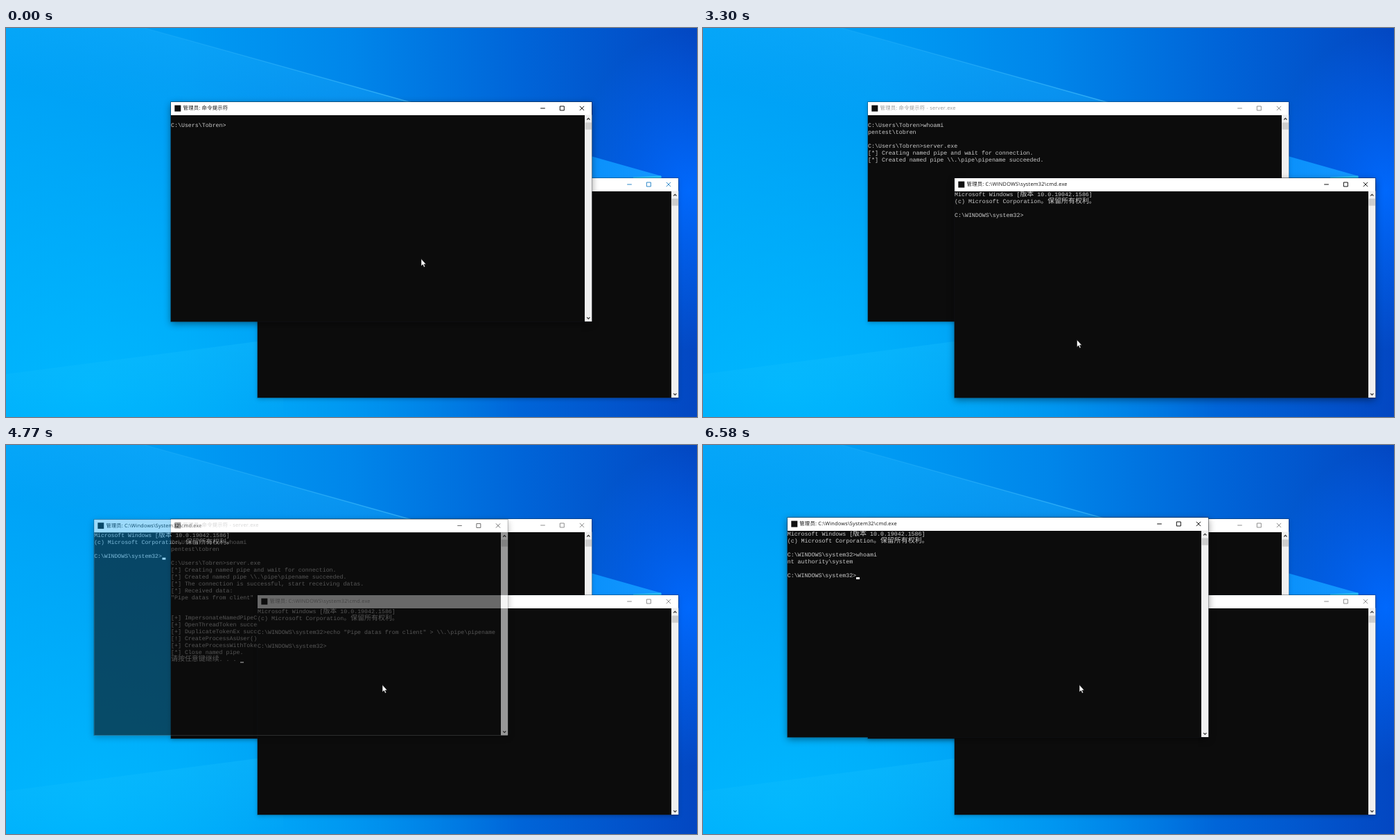
These frames come from a looping animation (997x562 px, 7220 ms). An HTML page:

```html
<!DOCTYPE html>
<html lang="zh-CN">
<head>
<meta charset="utf-8">
<title>Console</title>
<style>
html, body { margin: 0; width: 100%; height: 100%; overflow: hidden; }
#stage {
  position: relative; width: 997px; height: 562px; overflow: hidden;
  text-rendering: geometricPrecision;
  background:
    radial-gradient(170px 230px at 985px 235px, rgba(0,106,255,.95), rgba(0,106,255,0)),
    radial-gradient(620px 460px at 120px 520px, rgba(0,186,255,.85), rgba(0,186,255,0)),
    linear-gradient(90deg, #00a3f7 0, #009cf4 25%, #0086ea 50%, #0064d8 75%, #0347c2 100%);
}
#stage > svg { position: absolute; left: 0; top: 0; }
.win {
  position: absolute; width: 607.3px; height: 317px; background: #fff;
  box-shadow: 0 0 0 .6px rgba(25,35,45,.55), 0 2px 6px rgba(0,0,0,.25);
}
.win.active { box-shadow: 0 0 0 .6px rgba(20,25,30,.75), 0 3px 10px rgba(0,0,0,.45); }
.win svg { position: absolute; left: 0; top: 0; overflow: visible; }
.title {
  position: absolute; left: 17.6px; top: 0; line-height: 18.4px; white-space: pre;
  font: 7.35px/18.4px "Open Sans", "Noto Sans CJK SC", "Noto Sans CJK", sans-serif;
  letter-spacing: .22px; color: #999;
}
.active .title { color: #111; }
.body {
  position: absolute; left: 0; top: 18.6px; width: 597.2px; height: 298.4px;
  overflow: hidden; background: #0c0c0c;
}
.text {
  position: absolute; left: 0; top: 1.5px; color: #ccc; white-space: pre;
  font: 8.29px/9.95px "Liberation Mono", monospace;
}
.text div { height: 9.95px; }
.text span { font: 9.95px/0 "Noto Sans CJK SC", "Noto Sans CJK", sans-serif; }
.caret { position: absolute; width: 5px; height: 2.5px; background: #f2f2f2; }
</style>
</head>
<body>
<div id="stage">
  <svg width="997" height="562">
    <defs>
      <linearGradient id="beam" gradientUnits="userSpaceOnUse" x1="420" y1="60" x2="385" y2="185">
        <stop offset="0" stop-color="#20b4ff" stop-opacity=".3"/>
        <stop offset="1" stop-color="#20b4ff" stop-opacity="0"/>
      </linearGradient>
      <linearGradient id="edge" gradientUnits="userSpaceOnUse" x1="200" y1="0" x2="580" y2="106">
        <stop offset="0" stop-color="#4cc6ff" stop-opacity=".1"/>
        <stop offset="1" stop-color="#4cc6ff" stop-opacity=".6"/>
      </linearGradient>
      <linearGradient id="floor" x1="0" y1="0" x2="0" y2="1">
        <stop offset="0" stop-color="#1cc4ff" stop-opacity=".3"/>
        <stop offset="1" stop-color="#1cc4ff" stop-opacity="0"/>
      </linearGradient>
      <linearGradient id="ray" x1="0" y1="0" x2="1" y2="0">
        <stop offset="0" stop-color="#0a90fb"/>
        <stop offset="1" stop-color="#1498ff"/>
      </linearGradient>
    </defs>
    <path d="M200 0L600 112V240H0V0Z" fill="url(#beam)"/>
    <path d="M200 0L600 112" stroke="url(#edge)" stroke-width="1.4"/>
    <path d="M0 500L400 448V562H0Z" fill="url(#floor)"/>
    <path d="M840 184L946 214V217H840Z" fill="url(#ray)"/>
    <path d="M905 215.500L945 213.500V217H905Z" fill="#27c0fb"/>
  </svg>
</div>
<script>
const LOOP = 7220, CELL = 4.975, ROW = 9.95;
const stage = document.getElementById('stage');
const raw = String.raw;

function makeWindow(x, y) {
  const el = document.createElement('div');
  el.style.left = x + 'px';
  el.style.top = y + 'px';
  el.innerHTML = `<div class="title"></div>
    <div class="body"><div class="text"></div><div class="caret"></div></div>
    <svg width="607" height="317" fill="none">
      <rect x="5.300" y="4.600" width="9" height="9" fill="#101010"/>
      <path class="ink" d="M533.200 9h6.600M561.300 6h6v6h-6zM589.800 5.900l6.200 6.200M596 5.900l-6.200 6.200"/>
      <path d="M597.200 18.600h10.100v298.400h-10.100z" fill="#f0f0f0"/>
      <path d="M597.700 29.500h9.200v10.200h-9.200z" fill="#cdcdcd"/>
      <path d="M600.200 25.500l2.100-2.100 2.100 2.100M600.200 311l2.100 2.100 2.100-2.100" stroke="#333" stroke-width="1.200"/>
    </svg>`;
  stage.append(el);
  const [title, text, caret, ink] = ['.title', '.text', '.caret', '.ink'].map(s => el.querySelector(s));
  let last = '';
  return {
    el,
    show({ name, lines, cursor, active, color }) {
      el.className = active ? 'win active' : 'win';
      ink.setAttribute('stroke', color || (active ? '#111' : '#8e8e8e'));
      caret.style.display = cursor ? '' : 'none';
      const key = name + lines.join('\n');
      if (key === last) return;
      last = key;
      title.textContent = name;
      text.innerHTML = lines.map(s =>
        `<div>${s.replace(/[\u3000-\u9fff]+/g, '<span>$&</span>')}</div>`).join('');
      const end = lines[lines.length - 1];
      const cols = end.replace(/[\u3000-\u9fff]/g, '##').length;
      caret.style.left = cols * CELL + 'px';
      caret.style.top = lines.length * ROW - 2 + 'px';
    }
  };
}

const server = makeWindow(238, 107);
const client = makeWindow(363, 217);
const system = makeWindow(121.7, 105);

const pointer = document.createElementNS('http://www.w3.org/2000/svg', 'svg');
pointer.setAttribute('width', 12);
pointer.setAttribute('height', 16);
pointer.style.zIndex = 9;
pointer.innerHTML = '<path d="M.5.500V11L2.900 8.800L4.500 12.500L6.200 11.800L4.600 8.200H7.600Z" fill="#fff" stroke="#111" stroke-width=".6"/>';
stage.append(pointer);

const USER = raw`C:\Users\Tobren>`, SYS = raw`C:\WINDOWS\system32>`;
const BANNER = ['Microsoft Windows [版本 10.0.19042.1586]', '(c) Microsoft Corporation。保留所有权利。', ''];
const ECHO = raw`echo "Pipe datas from client" > \\.\pipe\pipename`;
const WAITING = ['[*] Creating named pipe and wait for connection.',
  raw`[*] Created named pipe \\.\pipe\pipename succeeded.`];
const RESULT = ['[*] The connection is successful, start receiving datas.', '[*] Received data:',
  '"Pipe datas from client" ', '', '', '[+] ImpersonateNamedPipeClient succeeded.',
  '[+] OpenThreadToken succeeded.', '[+] DuplicateTokenEx succeeded.',
  '[!] CreateProcessAsUser() failed.', '[+] CreateProcessWithTokenW succeeded.',
  '[*] Close named pipe.', '请按任意键继续. . . '];

const WHO_1 = [270, 340, 400, 460, 530, 600];
const RUN = [1050, 1120, 1320, 1390, 1450, 1650, 1710, 1850, 1940, 2040];
const WHO_2 = [5620, 5730, 5840, 5840, 5960, 6100];

// [time, x, y]
const MOVES = [[0, 598.5, 333], [2910, 586, 357], [2980, 563, 402], [3040, 546, 437], [3110, 539, 450],
  [3370, 540, 431], [3430, 541.5, 394], [3490, 542.2, 360], [3560, 542.5, 346]];
// [time, scale, opacity]
const OPENING = [[0, 1, 0], [4700, .955, .22], [4770, .983, .61], [4840, .991, .82], [4910, .996, .92], [4970, 1, 1]];

const typed = (s, times, t) => s.slice(0, times.filter(k => k <= t).length);
const at = (table, t) => table.filter(r => r[0] <= t).pop();
const within = (t, a, b) => t >= a && t < b;

function serverLines(t) {
  const lines = ['', USER + typed('whoami', WHO_1, t)];
  if (t >= 800) lines.push('');
  if (t >= 920) lines.splice(2, 1, raw`pentest\tobren`, '', USER + typed('server.exe', RUN, t));
  if (t >= 2380) lines.push(...WAITING);
  if (t >= 4430) lines.push(...RESULT);
  else if (t >= 2250) lines.push('');
  return lines;
}

function clientLines(t) {
  if (t < 3300) return BANNER;
  const lines = [...BANNER, SYS + (t >= 3970 ? ECHO : '')];
  if (t >= 4360) lines.push('', SYS);
  return lines;
}

function systemLines(t) {
  const lines = [...BANNER, SYS + typed('whoami', WHO_2, t)];
  if (t >= 6490) lines.push(raw`nt authority\system`, '');
  if (t >= 6580) lines.push(SYS);
  return lines;
}

function render(t) {
  const swapped = t >= 3300;
  server.el.style.zIndex = swapped ? 1 : 2;
  client.el.style.zIndex = swapped ? 2 : 1;
  server.show({
    name: '管理员: 命令提示符' + (t >= 2250 ? ' - server.exe' : ''),
    lines: serverLines(t),
    cursor: within(t, 740, 2040) || within(t, 2250, 2910) || t >= 4430,
    active: !swapped
  });
  client.show({
    name: raw`管理员: C:\WINDOWS\system32\cmd.exe`,
    lines: clientLines(t),
    cursor: within(t, 3830, 4360),
    active: within(t, 3300, 4570),
    color: swapped ? '' : '#2b86c8'
  });
  system.show({
    name: raw`管理员: C:\Windows\System32\cmd.exe`,
    lines: systemLines(t),
    cursor: !within(t, 6160, 6580),
    active: true
  });
  const [, scale, opacity] = at(OPENING, t);
  Object.assign(system.el.style, { zIndex: 3, opacity, transform: scale < 1 ? `scale(${scale})` : 'none' });
  const [, x, y] = at(MOVES, t);
  pointer.style.transform = `translate(${x}px, ${y}px)`;
}

const start = performance.now();
function tick() {
  render((performance.now() - start) % LOOP);
  requestAnimationFrame(tick);
}
tick();
</script>
</body>
</html>
```
